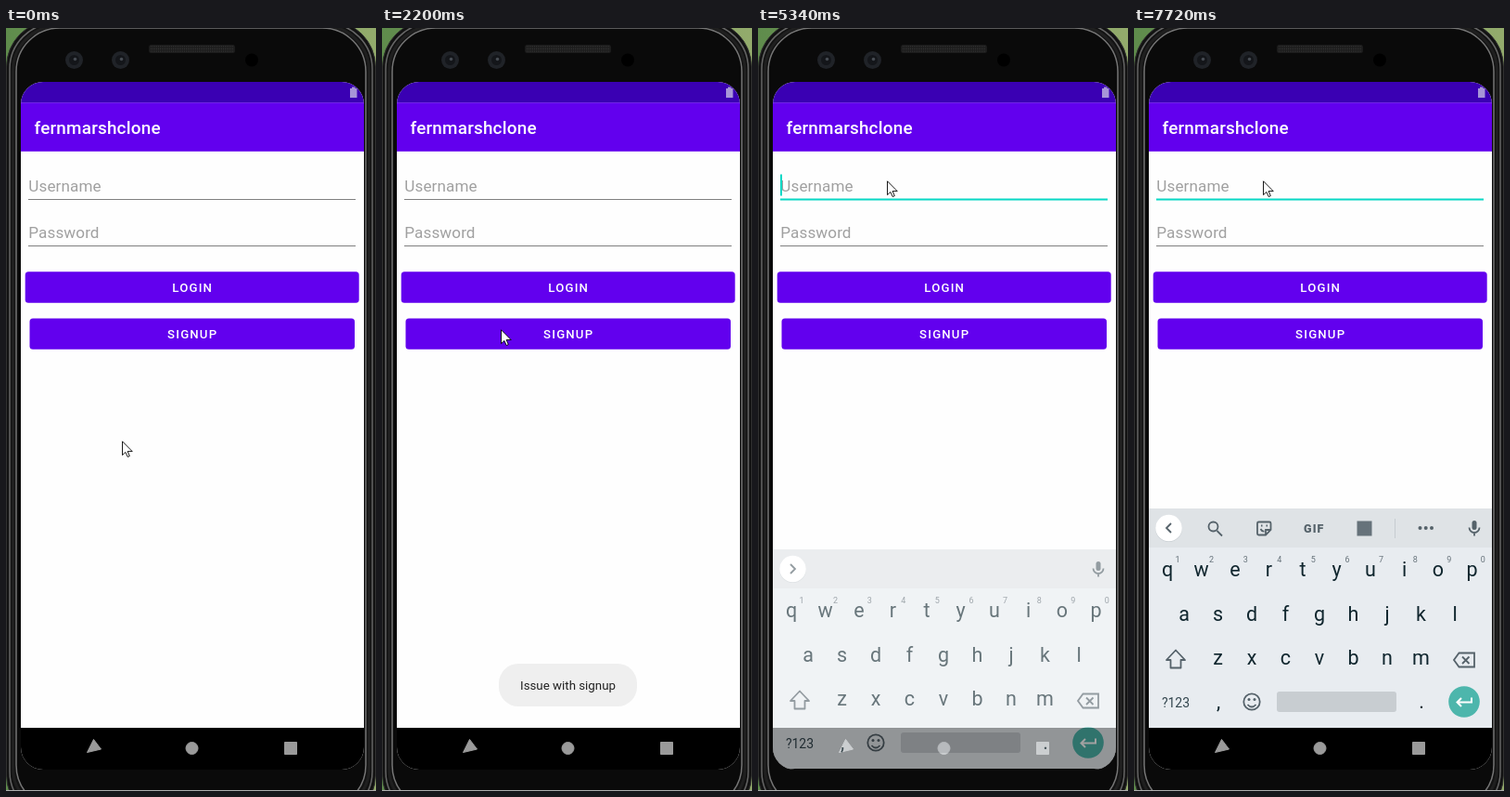
An HTML page that plays this animation: 399 by 821 pixels, repeating every 8 s.

```html
<!DOCTYPE html>
<html lang="en">
<head>
<meta charset="utf-8">
<style>
  html, body { margin: 0; width: 100%; height: 100%; overflow: hidden; background: #0a0a0a; }
  svg { display: block; width: 399px; height: 821px; font-family: Roboto, sans-serif; }
  .mid { text-anchor: middle; }
  .button { font-size: 13.2px; font-weight: 500; letter-spacing: 1.18px; fill: #fff; }
  .hint { font-size: 17.1px; letter-spacing: .1px; fill: #a0a0a0; }
  .key { font-size: 21.5px; fill: #10262e; }
  .digit { font-size: 9px; fill: #66727a; }
  .line { fill: none; stroke: #55626a; stroke-width: 1.8; }
</style>
</head>
<body>
<svg viewBox="0 0 399 821">
  <defs>
    <clipPath id="screen"><rect x="16" y="58" width="370" height="740" rx="24"/></clipPath>
    <filter id="blur" x="-5%" y="-30%" width="110%" height="160%"><feGaussianBlur stdDeviation="1.4"/></filter>
    <linearGradient id="grass"><stop stop-color="#5f8c4c"/><stop offset="1" stop-color="#93ab6c"/></linearGradient>
  </defs>

  <!-- phone body -->
  <rect width="399" height="821" fill="url(#grass)"/>
  <g fill="none">
    <rect x="0.5" y="-8" width="398" height="862" rx="50" fill="#121212" stroke="#303030"/>
    <rect x="4" y="-5" width="391" height="854" rx="49" stroke="#666" stroke-width="1.500"/>
    <rect x="7.500" y="-2" width="384" height="846" rx="48" stroke="#1f1f1f" stroke-width="3"/>
    <rect x="11" y="0" width="377" height="840" rx="47" fill="#0a0a0a" stroke="#757575" stroke-width="1.500"/>
  </g>
  <path d="M0 820.500h399" stroke="#b0b0b0"/>
  <rect x="154" y="18" width="93" height="9" rx="2.500" fill="#1c1c1c"/>
  <path d="M156 20h89M156 22.500h89M156 25h89" stroke="#3a3a3a" stroke-dasharray="1 1"/>
  <g id="lenses"></g>
  <circle cx="265" cy="34.500" r="7" fill="#000"/>

  <g clip-path="url(#screen)">
    <rect x="16" y="58" width="370" height="740" fill="#fefefe"/>
    <rect x="16" y="58" width="370" height="22.500" fill="#3a00b3"/>
    <path d="M371 65h2v-1.500h3.500V65h2v10h-7.500z" fill="#a796d8"/>
    <rect x="16" y="80.300" width="370" height="52.500" fill="#6200ee"/>
    <text x="30.500" y="114" font-size="18.9" font-weight="500" letter-spacing=".2" fill="#fff">fernmarshclone</text>

    <text class="hint" x="24.300" y="176">Username</text>
    <text class="hint" x="24.300" y="226">Password</text>
    <path d="M24 184.500h353M24 234.500h353" stroke="#808080"/>
    <path id="focus" d="M24 184.500h353" stroke="#08d8c5" stroke-width="2"/>
    <rect id="caret" x="24" y="157.500" width="2" height="23" fill="#08d8c5"/>

    <rect x="20.700" y="262.200" width="360" height="33.600" rx="3.500" fill="#6200ee"/>
    <text class="button mid" x="201.200" y="284">LOGIN</text>
    <rect id="shadow" x="25" y="314" width="351.500" height="34" rx="4" fill="#000" opacity=".35" filter="url(#blur)"/>
    <rect id="signup" x="25.500" y="312.400" width="350.500" height="33.300" rx="3.500"/>
    <text class="button mid" x="201.200" y="334">SIGNUP</text>

    <g id="toast">
      <rect x="126" y="684" width="149" height="46" rx="21" fill="#efefef"/>
      <text class="mid" x="200.500" y="712" font-size="13.3" fill="#222">Issue with signup</text>
    </g>

    <rect x="16" y="753" width="370" height="45" fill="#000"/>
    <g fill="#9a9a9a" stroke="#9a9a9a" stroke-linejoin="round">
      <path d="M94.500 765.500L87.500 779.500L102.500 776z"/>
      <circle cx="200.500" cy="775" r="6.500"/>
      <rect x="300.500" y="768.500" width="13" height="13"/>
    </g>

    <g id="keyboard">
      <rect x="16" y="517" width="370" height="42" fill="#dfe3e6"/>
      <rect x="16" y="559" width="370" height="194" fill="#e8ecf0"/>
      <circle cx="37.500" cy="538.500" r="14.500" fill="#c9cfd3"/>
      <circle cx="37.500" cy="538" r="14.300" fill="#fff"/>
      <path id="chevron" class="line" d="M40 533l-5 5l5 5"/>
      <g id="tools">
        <path class="line" d="M89.500 541l5.500 5.500"/>
        <circle class="line" cx="85.500" cy="536.500" r="5"/>
        <path class="line" d="M134.500 531.500h11.500q1.500 0 1.500 1.500v7l-5.500 5.500h-7.500q-1.500 0-1.500-1.500v-11q0-1.500 1.500-1.500zM147 540h-5v5M136.500 539q1.500 3 4 2.500M137 535.500h1.500M142.500 535.500h1.500" stroke-width="1.600"/>
        <text class="mid" x="194.300" y="542.500" font-size="12.5" font-weight="900" letter-spacing="1.2" fill="#55626a">GIF</text>
        <rect x="240.500" y="530.500" width="16" height="16" fill="#66727a"/>
        <path d="M281.500 528v21" stroke="#c6ccd0"/>
        <g fill="#55626a"><circle cx="308.500" cy="538" r="2"/><circle cx="314.700" cy="538" r="2"/><circle cx="321" cy="538" r="2"/></g>
      </g>
      <rect x="364.500" y="530" width="5" height="10" rx="2.500" fill="#55626a"/>
      <path class="line" d="M361.500 537.500a5.500 5.500 0 0 0 11 0M367 543v3.500" stroke-width="1.500"/>
      <g id="keys"></g>
      <path class="line" d="M45 669.500l10 10.500h-4.500v8.500h-11v-8.500h-4.500z" stroke-linejoin="round"/>
      <path class="line" d="M350.500 672.500h16.500v15h-16.500l-5.500-7.500zM354 676.500l7.500 7.500M361.500 676.500l-7.500 7.500"/>
      <text class="mid" x="45" y="731" font-size="14" fill="#33464e">?123</text>
      <circle class="line" cx="127" cy="725" r="8.700"/>
      <path class="line" d="M122.500 728q4.500 5 9 0"/>
      <g fill="#55626a"><circle cx="124" cy="722.500" r="1.500"/><circle cx="130" cy="722.500" r="1.500"/></g>
      <rect x="154" y="714" width="129" height="22" rx="3" fill="#c8cdd1"/>
      <circle cx="356" cy="725" r="16.800" fill="#4db6ac"/>
      <path d="M364 720.500v5h-15M353 721l-4.500 4.500l4.500 4.500" fill="none" stroke="#fff" stroke-width="2"/>
    </g>
  </g>

  <path id="cursor" d="M.5 .8V15.600L3.900 12.500L6.200 17.500L8.300 16.600L6.100 11.600H11.200z" fill="#fff" stroke="#000" stroke-width=".9"/>
</svg>
<script>
const $ = id => document.getElementById(id);
const label = (cls, x, y, s) => `<text class="${cls} mid" x="${x}" y="${y}">${s}</text>`;
const row = (letters, x, y) => [...letters].map((c, i) => label("key", x + i * 36.5, y, c)).join("");

$("keys").innerHTML = row("qwertyuiop", 36, 590) + row("asdfghjkl", 54, 637.5) + row("zxcvbnm", 90.5, 685) +
  [..."1234567890"].map((c, i) => label("digit", 47 + i * 36.6, 575, c)).join("") +
  label("key", 91, 732, ",") + label("key", 310, 732, ".");

$("lenses").innerHTML = [73.5, 123.5].map(x =>
  `<circle cx="${x}" cy="34.500" r="9.500" fill="#202328"/><circle cx="${x}" cy="34.500" r="5.500" fill="#14161a"/>
   <circle cx="${x + 1}" cy="33.500" r="1.800" fill="#464b52"/>`).join("");

// Each step: start time in ms, then values held until the next step.
const cursorSteps = [[0, 125, 444], [380, 151, 363], [560, 154, 308], [730, 140, 312], [920, 128, 324],
  [3500, 205, 696], [3680, 225, 784], [3850, 243, 788], [4050, -50, -50], [4600, 139, 164]];
const toastSteps = [[0, 0], [1840, .3], [2020, .7], [2200, 1], [3680, .7], [3850, .35], [4050, 0]];
const caretSteps = [[0, 0], [5160, 1], [5700, 0], [6270, 1], [6620, 0], [7160, 1], [7720, 0]];

const held = (steps, t) => steps.findLast(s => s[0] <= t).slice(1);
const within = (t, a, b) => t >= a && t < b;
const show = (id, on) => $(id).setAttribute("visibility", on ? "inherit" : "hidden");
const set = (id, name, value) => $(id).setAttribute(name, value);

function draw(t) {
  const rising = within(t, 5340, 5520);
  set("cursor", "transform", `translate(${held(cursorSteps, t)})`);
  set("toast", "opacity", held(toastSteps, t)[0]);
  set("signup", "fill", within(t, 1480, 1660) ? "#8137f3" : "#6200ee");
  show("shadow", within(t, 1480, 1840));
  show("focus", t >= 5160);
  show("caret", held(caretSteps, t)[0]);
  show("keyboard", t >= 5340);
  set("keyboard", "opacity", rising ? .63 : 1);
  set("keyboard", "transform", `translate(0 ${rising ? 44 : 0})`);
  show("tools", !rising);
  set("chevron", "transform", rising ? "translate(75 0) scale(-1 1)" : "");
}

function tick() {
  draw(performance.now() % 8000);
  requestAnimationFrame(tick);
}
tick();
</script>
</body>
</html>
```
